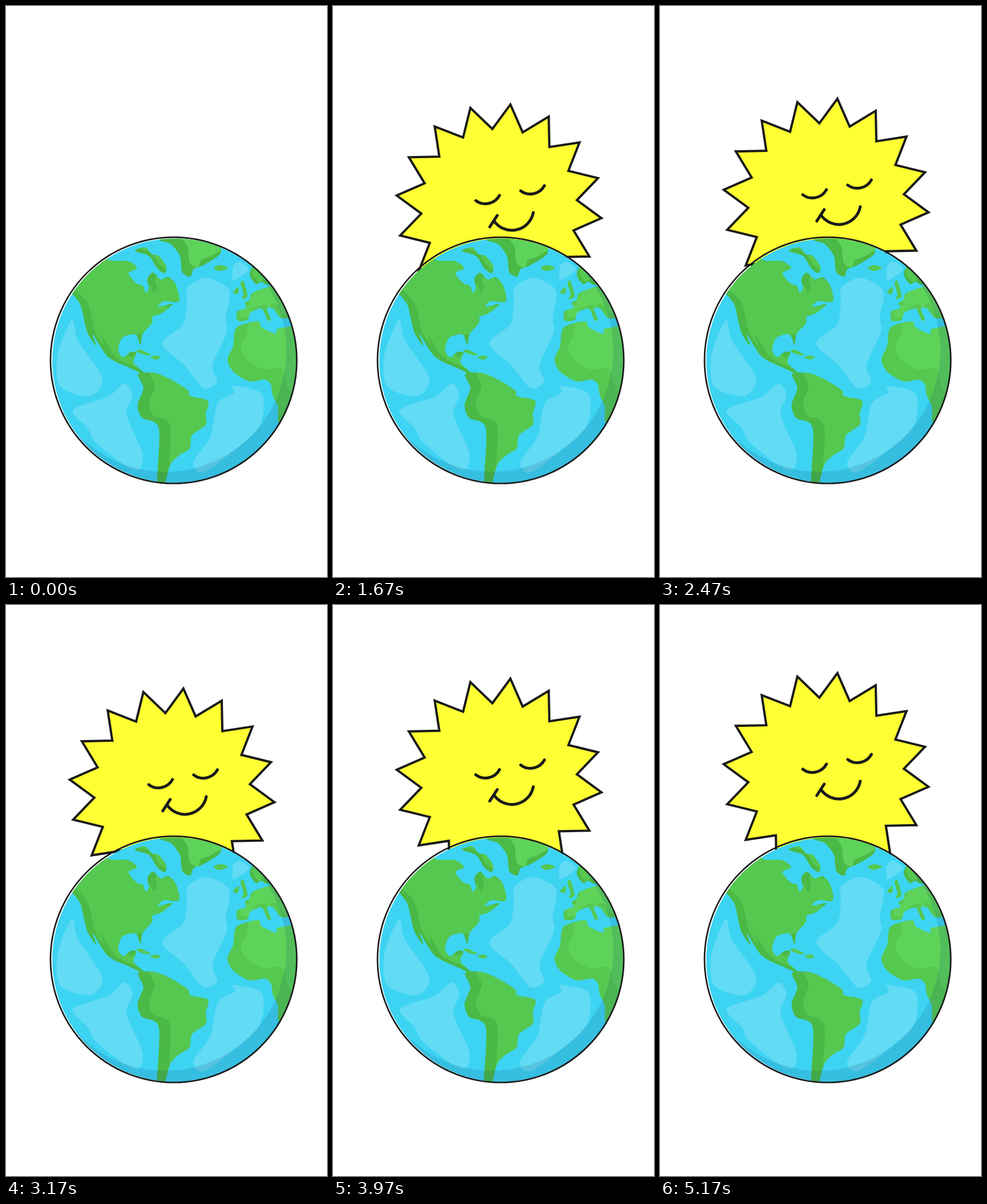
Recreate the animation shown at these times as an HTML page with a canvas. Size 561 by 998 pixels, loop 5.63 s.

```html
<!DOCTYPE html>
<html lang="en">
<head>
<meta charset="utf-8">
<title>Sunrise over the globe</title>
<style>
html, body { margin: 0; width: 561px; height: 998px; overflow: hidden; background: #fff; }
canvas { display: block; }
</style>
</head>
<body>
<canvas id="stage" width="561" height="998"></canvas>
<script>
const ctx = document.getElementById('stage').getContext('2d');
const LOOP = 5630, RISE_START = 1130, RISE_END = 5170, FADE = 500, RISE = 55;
const INK = '#1a1a1a', BLUE = '#3dd4f4', PALE = '#62dbf4';
const DARK = '#4bb945', GREEN = '#55c850', LIGHT = '#5dd35a';

// Closed smooth curve through a few key points
function blob(text) {
  const pts = text.split(' ').map(p => p.split(',').map(Number));
  const at = i => pts[(i + pts.length) % pts.length];
  const path = new Path2D();
  path.moveTo(...pts[0]);
  pts.forEach((p, i) => {
    const before = at(i - 1), next = at(i + 1), after = at(i + 2);
    const out = k => p[k] + (next[k] - before[k]) / 7;
    const into = k => next[k] - (after[k] - p[k]) / 7;
    path.bezierCurveTo(out(0), out(1), into(0), into(1), ...next);
  });
  path.closePath();
  return path;
}

function disc(x, y, r) {
  const path = new Path2D();
  path.arc(x, y, r, 0, Math.PI * 2);
  return path;
}

function star(x, y, spikes, outer, inner, turn) {
  const path = new Path2D();
  for (let i = 0; i < spikes * 2; i++) {
    const r = i % 2 ? inner : outer, angle = turn + i * Math.PI / spikes;
    path.lineTo(x + r * Math.cos(angle), y + r * Math.sin(angle));
  }
  path.closePath();
  return path;
}

const sunBody = star(290.3, 298, 16, 180, 136.5, 0.11);
const eye = 'a28,28 0 0 0 41.5,-9';
const sunFace = new Path2D(`M249.5,287${eye}M328,270${eye}M281,322A38,38 0 0 0 350,308M274,333L287,313`);

const rim = disc(293, 619.3, 215.2);
const ocean = disc(294.5, 620, 213.6);
const shade = disc(294.5, 620, 213.6);
shade.addPath(disc(278, 602, 212));

const paleWater = [
  '115,549 126,585 168,650 147,682 95,665 90,610',
  '117,706 178,683 207,660 221,680 211,715 238,780 232,810 205,801 156,762 143,738',
  '317,492 350,475 390,497 384,545 386,570 361,628 369,657 345,668 312,628 273,590 310,556 316,515',
  '397,664 447,678 443,735 395,780 345,815 327,798 357,753 370,695 399,676',
  '397,455 408,447 425,460 405,476 396,478'
].map(blob);

// Outline, offset of the sunlit copy, its colour, colour of the shaded side
const lands = [
  ['90,470 150,420 180,444 213,446 229,458 214,467 228,485 239,489 244,501 250,493 247,477 257,466 270,478 284,474 297,488 302,516 276,516 266,526 291,521 272,537 256,543 255,554 239,573 235,592 226,574 203,580 196,602 205,614 217,605 228,606 223,624 246,645 215,632 178,613 152,574 158,594 142,570 131,525 120,508',
    14, 0, GREEN, DARK],
  ['231,643 262,642 292,655 318,672 322,682 353,690 349,712 349,732 325,750 321,773 303,785 287,802 276,840 264,838 267,738 238,720 230,697 240,668',
    20, -4, GREEN, DARK],
  ['403,562 440,551 447,562 472,573 476,564 520,570 515,690 478,728 475,700 466,680 463,662 452,653 425,656 397,639 387,618 397,594',
    24, -21, LIGHT, GREEN],
  ['268,407 290,380 370,390 376,422 372,436 345,453 328,460 322,473 308,465 304,437 288,416',
    13, -16, LIGHT, DARK],
  ['430,502 426,513 417,519 420,528 404,534 405,550 422,549 427,536 447,529 457,549 463,548 456,529 467,529 480,545 498,545 520,540 490,485 456,492',
    6, -7, LIGHT, GREEN],
  ['225,428 243,422 255,434 267,437 280,455 277,467 264,458 250,437', 4, -6, GREEN, DARK],
  ['436,456 426,470 437,486 446,482 456,487 480,485', 4, -4, GREEN, DARK],
  ['363,457 376,453 388,458 372,463'],
  ['397,501 402,494 407,492 405,503'],
  ['410,485 415,481 422,507 412,512 415,503'],
  ['228,603 236,601 253,610 240,609'],
  ['253,614 262,611 270,614 262,618']
].map(([outline, ...light]) => [blob(outline), ...light]);

function fill(color, path, rule = 'nonzero') {
  ctx.fillStyle = color;
  ctx.fill(path, rule);
}

function drawSun(time) {
  if (time < RISE_START) return;
  const p = Math.min(1, (time - RISE_START) / (RISE_END - RISE_START));
  const eased = p < 0.5 ? 2 * p * p : 1 - 2 * (1 - p) ** 2;
  ctx.save();
  ctx.globalAlpha = Math.min(1, (time - RISE_START) / FADE);
  ctx.translate(0, RISE * (1 - eased));
  fill('#ffff33', sunBody);
  ctx.strokeStyle = INK;
  ctx.lineWidth = 4;
  ctx.stroke(sunBody);
  ctx.lineWidth = 5;
  ctx.lineCap = 'round';
  ctx.stroke(sunFace);
  ctx.restore();
}

function drawLand([outline, dx = 0, dy = 0, lit = GREEN, shaded = GREEN]) {
  fill(shaded, outline);
  ctx.save();
  ctx.clip(outline);
  ctx.translate(dx, dy);
  fill(lit, outline);
  ctx.restore();
}

function drawGlobe() {
  ctx.save();
  fill(BLUE, ocean);
  ctx.clip(ocean);
  paleWater.forEach(path => fill(PALE, path));
  lands.forEach(drawLand);
  fill('rgba(20,60,100,.14)', shade, 'evenodd');
  ctx.restore();
  ctx.strokeStyle = INK;
  ctx.lineWidth = 2.7;
  ctx.stroke(rim);
}

function frame() {
  ctx.clearRect(0, 0, 561, 998);
  drawSun(performance.now() % LOOP);
  drawGlobe();
  requestAnimationFrame(frame);
}
frame();
</script>
</body>
</html>
```
